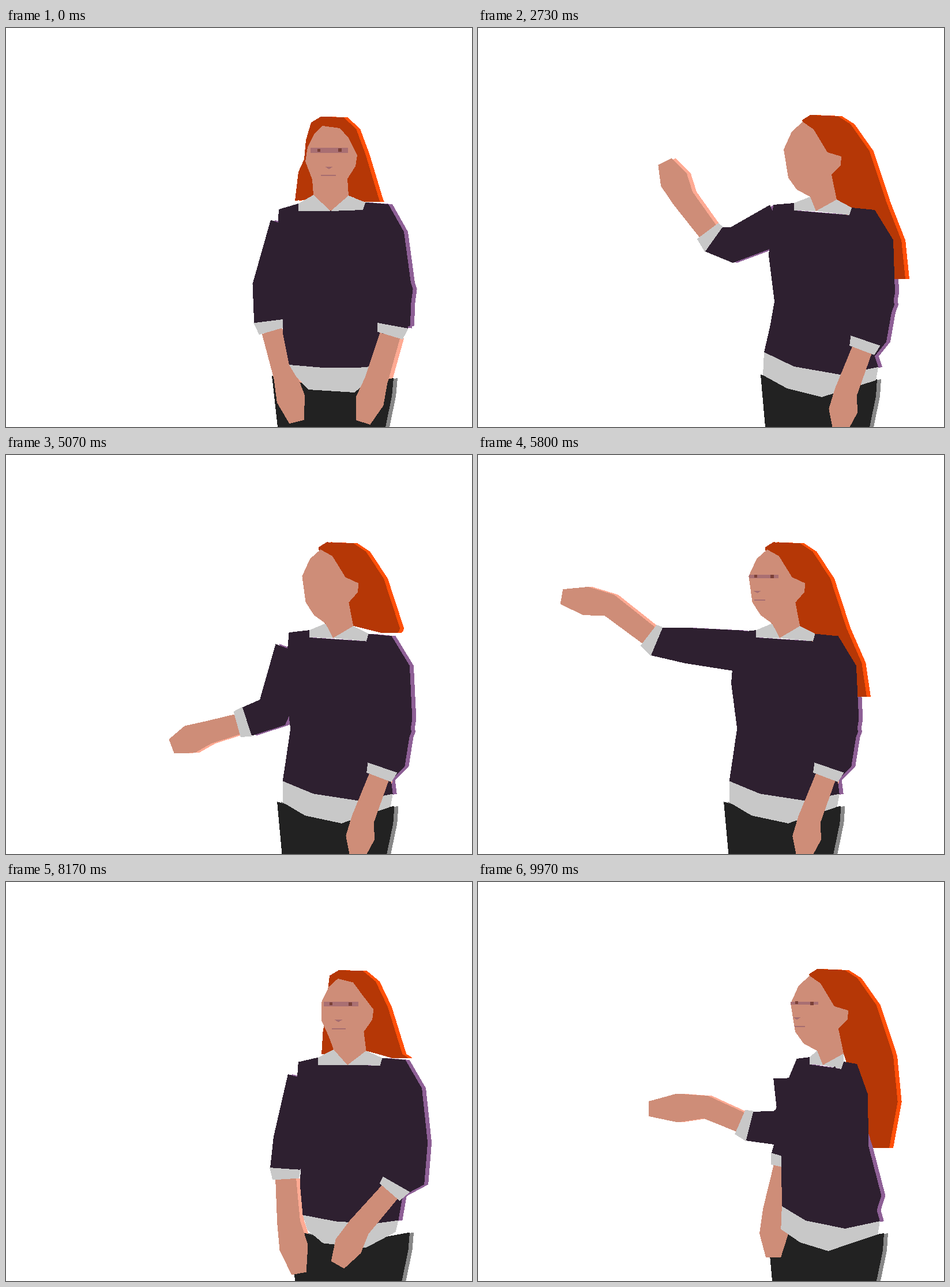
An HTML page that plays this animation: 808 px wide and 693 px high, repeating every 10 s.

```html
<!DOCTYPE html>
<html lang="en">
<head>
<meta charset="utf-8">
<title>Presenter</title>
<style>
html, body { margin: 0; width: 100%; height: 100%; overflow: hidden; background: #fff; }
svg { display: block; width: 100%; height: 100%; shape-rendering: crispEdges; }
</style>
</head>
<body>
<svg viewBox="0 0 808 693"><g id="figure"></g></svg>
<script>
const LOOP = 10000, STEP = 1000 / 30, RIM = 7;

const lerp = (a, b, k) => a + (b - a) * k;
const mid = (p, q, k) => [lerp(p[0], q[0], k), lerp(p[1], q[1], k)];
const clamp = v => Math.min(1, Math.max(0, v));
const dist = (p, q) => Math.hypot(q[0] - p[0], q[1] - p[1]);
const angle = (p, q) => Math.atan2(q[1] - p[1], q[0] - p[0]);
const polar = ([x, y], r, a) => [x + r * Math.cos(a), y + r * Math.sin(a)];
const nearTurn = d => Math.atan2(Math.sin(d), Math.cos(d));

// Body points: x, y facing front, then x, y facing sideways; x is from the neck
const SKIN = [
  [-14, 170, -23, 163], [16, 174, -4, 176], [31, 191, 20, 216], [46, 221, 44, 223],
  [43, 240, 43, 238], [29, 262, 27, 255], [31, 291, 36, 298], [0, 318, 0, 318],
  [-30, 290, -10, 293], [-32, 263, -33, 281], [-44, 232, -48, 260], [-40, 207, -56, 211],
  [-28, 183, -42, 180]
];
const HAIR = [
  [-62, 300, -5, 297], [-56, 250, -10, 270], [-46, 228, -5, 225], [-43, 195, -15, 190],
  [-34, 164, -24, 160], [-17, 154, -10, 151], [22, 155, 38, 153], [44, 175, 60, 167],
  [60, 218, 93, 214], [84, 298, 122, 302]
];
const LEFT = [
  [-83, 530, -80, 520], [-84, 475, -72, 475], [-95, 400, -82, 395],
  [-90, 315, -74, 307], [-56, 305, -38, 304]
];
const RIGHT = [
  [60, 303, 62, 312], [100, 306, 102, 316], [127, 354, 134, 368],
  [140, 450, 137, 460], [138, 517, 122, 545], [93, 535, 102, 570]
];
const HEM = [
  [-72, 585, -90, 563], [-13, 590, -38, 588], [47, 590, 42, 602], [80, 587, 108, 589],
  [75, 606, 104, 612], [41, 633, 10, 641], [-39, 628, -50, 626], [-60, 605, -92, 603]
];
const PANTS = [
  [-102, 604, -96, 602], [0, 628, 0, 628], [109, 608, 106, 610],
  [106, 640, 104, 640], [95, 693, 93, 693], [-92, 693, -88, 693]
];
const SHOULDERS = [[-70, 345, -65, 340], [70, 350, 70, 350]];
const FACE = [[-35, 212, -56, 209], [30, 212, -8, 212], [-3, 241, -45, 235], [-4, 256, -40, 251]];

// Arms run elbow, cuff, wrist, fingertips
const downL = [[-105, 450], [-107, 509], [-79, 605], [-59, 684]];
const downR = [[112, 458], [108, 517], [79, 612], [56, 685]];
const hangR = [[105, 480], [86, 543], [52, 632], [42, 698]];

const base = { turn: 0, girth: 1, face: 1, tail: [86, 302], armL: downL, armR: downR };
const front = { ...base, x: 563 };
const lean = { ...base, x: 570 };
const point = {
  ...base, x: 586, turn: 1, face: 0, tail: [155, 436], armR: hangR,
  armL: [[-146, 377], [-177, 367], [-231, 295], [-262, 232]]
};
const reach = {
  ...base, x: 567, turn: 0.85, face: 0, tail: [112, 309], armR: hangR,
  armL: [[-105, 447], [-149, 463], [-217, 482], [-280, 506]]
};
const present = {
  ...base, x: 520, turn: 0.85, tail: [151, 420], armR: hangR,
  armL: [[-160, 331], [-213, 324], [-295, 261], [-378, 246]]
};
const rest = {
  ...base, x: 592, turn: 0.3, tail: [106, 306],
  armL: [[-98, 450], [-108, 498], [-102, 590], [-84, 680]],
  armR: [[100, 480], [85, 525], [20, 600], [-17, 665]]
};
const offer = {
  ...base, x: 598, turn: 1, girth: 0.58, tail: [115, 462],
  armL: [[-46, 430], [-64, 478], [-84, 570], [-86, 652]],
  armR: [[-78, 428], [-127, 424], [-203, 391], [-302, 394]]
};

// Swing each bone from one direction to the other
function bend(a, b, k) {
  const out = [mid(a[0], b[0], k)];
  for (let i = 1; i < a.length; i++) {
    const from = angle(a[i - 1], a[i]), to = angle(b[i - 1], b[i]);
    const size = lerp(dist(a[i - 1], a[i]), dist(b[i - 1], b[i]), k);
    out.push(polar(out[i - 1], size, from + nearTurn(to - from) * k));
  }
  return out;
}

function blend(a, b, k) {
  const out = { tail: mid(a.tail, b.tail, k) };
  for (const name of ["x", "turn", "girth", "face"]) out[name] = lerp(a[name], b[name], k);
  for (const name of ["armL", "armR"]) out[name] = bend(a[name], b[name], k);
  return out;
}

// Narrow the body as it turns into full profile
function squeeze([x, y], girth) {
  const amount = x > 0
    ? 1 - 0.8 * clamp((y - 470) / 100)
    : clamp((390 - y) / 90) + 0.5 * clamp((y - 480) / 80);
  return [x * (1 - (1 - girth) * amount), y];
}

// Strip of varying width along part of a path
function ribbon(path, first, widths) {
  const near = [], far = [];
  widths.forEach((w, n) => {
    const i = first + n, p = path[i];
    const a = angle(path[Math.max(0, i - 1)], p), b = angle(p, path[i + 1] || p);
    const along = i === 0 ? b : i === path.length - 1 ? a : a + nearTurn(b - a) / 2;
    near.push(polar(p, w / 2, along + Math.PI / 2));
    far.unshift(polar(p, w / 2, along - Math.PI / 2));
  });
  return [...near, ...far];
}

function limb(shoulder, [elbow, cuff, wrist, tip]) {
  const edge = polar(cuff, 18, angle(cuff, wrist));
  const path = [shoulder, elbow, cuff, edge, wrist, mid(wrist, tip, 0.5), tip];
  return {
    sleeve: ribbon(path, 0, [72, 62, 52]),
    cuff: ribbon(path, 2, [54, 46]),
    hand: ribbon(path, 3, [36, 40, 50, 26])
  };
}

const bar = ([x, y], w, h) => [[x - w, y - h], [x + w, y - h], [x + w, y + h], [x - w, y + h]];

function build(s) {
  const turned = list => list.map(([a, b, c, d]) => [lerp(a, c, s.turn), lerp(b, d, s.turn)]);
  const body = list => turned(list).map(p => squeeze(p, s.girth));
  const skin = turned(SKIN), hair = turned(HAIR), hem = body(HEM);
  const left = body(LEFT), right = body(RIGHT), [shL, shR] = body(SHOULDERS);

  const side = hair[hair.length - 1], [tx, ty] = s.tail;
  const bulge = mid(side, s.tail, 0.5);
  bulge[0] += 0.07 * dist(side, s.tail);
  hair.push(bulge, s.tail, [tx - 28, ty], skin[6]);

  const neckL = left[left.length - 1], neckR = right[0];
  const lowL = [neckL[0], neckL[1] + 13], lowR = [neckR[0] - 4, neckR[1] + 13];
  const chest = [...left, lowL, lowR, ...right, ...hem.slice(0, 4).reverse()];

  const [lensL, lensR, nose, mouth] = turned(FACE);
  const half = (lensR[0] - lensL[0]) / 2;
  const armL = limb(shL, s.armL), armR = limb(shR, s.armR);
  return {
    pants: turned(PANTS), skin, hair, hem, chest,
    sleeveL: armL.sleeve, cuffL: armL.cuff, handL: armL.hand,
    sleeveR: armR.sleeve, cuffR: armR.cuff, handR: armR.hand,
    collarL: [skin[8], skin[7], lowL, neckL],
    collarR: [skin[6], neckR, lowR, skin[7]],
    glasses: bar(mid(lensL, lensR, 0.5), half, lerp(4.5, 2.5, s.turn)),
    nose: [[nose[0] - 7, nose[1]], [nose[0] + 7, nose[1]], [nose[0], nose[1] + 4]],
    mouth: bar(mouth, lerp(13, 9, s.turn), 1),
    eyeL: bar(mid(lensL, lensR, 0.22), 2.5, 2.5),
    eyeR: bar(mid(lensL, lensR, 0.78), 3, 3)
  };
}

// Time, pose, sideways sway
const KEYS = [
  [0, front, 0], [1370, lean, 0], [2070, lean, 10],
  [2560, point, 0], [2730, point, 0], [3050, blend(point, present, 0.1), 6],
  [3550, point, 0], [4130, blend(point, present, 0.08), 0],
  [4620, blend(present, reach, 0.25), 6], [5070, reach, 0],
  [5750, present, 3], [6670, present, 0], [6900, present, -4],
  [7260, blend(lean, rest, 0.3), 0], [8170, rest, 0], [8350, rest, 4],
  [9200, offer, 22], [9600, offer, -13], [9970, offer, 0], [LOOP, offer, 0]
];

const WOOL = ["#2e2030", "#8e6096"], FLESH = ["#ce8d78", "#ffaa93"], SHIRT = ["#c8c8c8"];
const LIP = ["#a66d70"], EYE = ["#7a4038"];
// Drawing order: fill, then rim light
const PARTS = {
  pants: ["#222222", "#888888"], hair: ["#b53706", "#ff5008"], skin: FLESH.slice(0, 1),
  sleeveL: WOOL, handL: FLESH, cuffL: SHIRT,
  chest: WOOL, hem: SHIRT, collarL: SHIRT, collarR: SHIRT,
  sleeveR: WOOL, handR: FLESH, cuffR: SHIRT,
  glasses: ["#a96f72"], nose: LIP, mouth: LIP, eyeL: EYE, eyeR: EYE
};
const FEATURES = ["glasses", "nose", "mouth", "eyeL", "eyeR"];

const figure = document.getElementById("figure");
function add(name, fill, shift) {
  const el = document.createElementNS("http://www.w3.org/2000/svg", "polygon");
  el.setAttribute("fill", fill);
  el.setAttribute("transform", `translate(${shift} 0)`);
  figure.append(el);
  return [name, el];
}
const parts = Object.entries(PARTS);
const layers = [
  ...parts.filter(([, c]) => c[1]).map(([name, c]) => add(name, c[1], RIM)),
  ...parts.map(([name, c]) => add(name, c[0], 0))
];

function draw(ms) {
  const t = Math.floor(ms % LOOP / STEP + 0.01) * STEP;
  const i = KEYS.findIndex(key => key[0] > t);
  const [t0, a, x0] = KEYS[i - 1], [t1, b, x1] = KEYS[i];
  const u = (t - t0) / (t1 - t0), k = u * u * (3 - 2 * u);
  const state = blend(a, b, k), shapes = build(state);
  figure.setAttribute("transform", `translate(${state.x + lerp(x0, x1, k)} 0)`);
  for (const [name, el] of layers) {
    const hidden = state.face < 1 && FEATURES.includes(name);
    el.style.display = hidden ? "none" : "";
    el.setAttribute("points", shapes[name].map(p => p.map(v => v.toFixed(1)).join()).join(" "));
  }
}

const start = performance.now();
function tick() {
  draw(performance.now() - start);
  requestAnimationFrame(tick);
}
tick();
</script>
</body>
</html>
```
